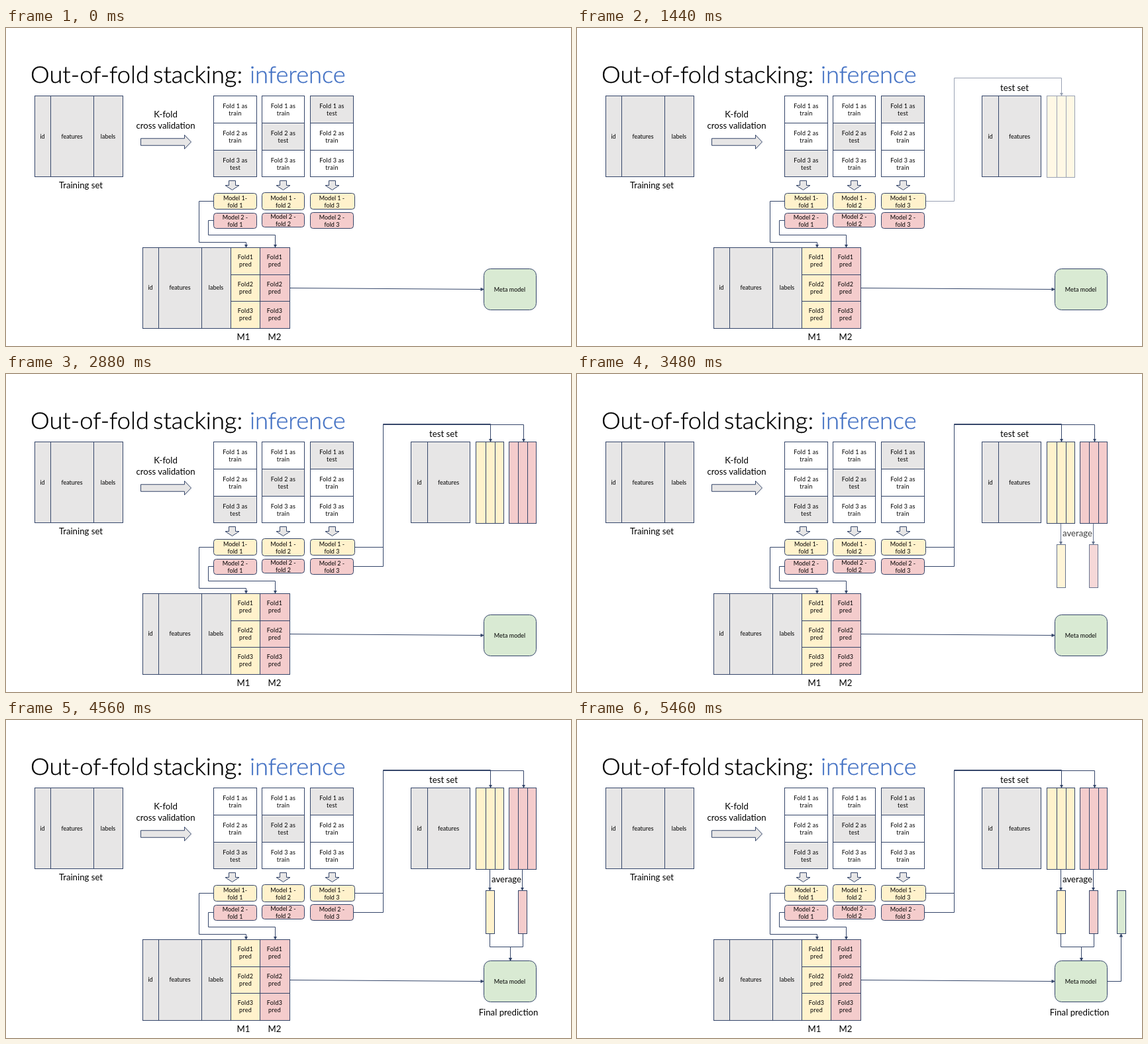
An HTML page that plays this animation: 853 px wide and 480 px high, repeating every 5.52 s.

```html
<!DOCTYPE html>
<html lang="en">
<head>
<meta charset="utf-8">
<title>Out-of-fold stacking</title>
<style>
  html, body { margin: 0; width: 100%; height: 100%; overflow: hidden; background: #fff; }
  svg { display: block; width: 853px; height: 480px; font-family: Lato, "Open Sans", sans-serif; }
  .shape, .line { stroke: #35466a; stroke-width: 1; }
  .line { fill: none; }
  .small { font-size: 9px; text-anchor: middle; }
  .fold { letter-spacing: .25px; }
  .label { font-size: 13.2px; text-anchor: middle; }
  .title { font-size: 36.3px; font-weight: 300; stroke: #000; stroke-width: .4; }
  .title .accent { fill: #4472c4; stroke: #4472c4; }
  .step { opacity: 0; animation: 5520ms infinite; animation-timing-function: steps(8); }

  /* Each step fades in over 480 ms and stays until the loop restarts. */
  #testSet  { animation-name: testSet; }
  #preds1   { animation-name: preds1; }
  #preds2   { animation-name: preds2; }
  #averages { animation-name: averages; }
  #final    { animation-name: final; }
  #result   { animation-name: result; }
  @keyframes testSet  { 0%, 5.4348%  { opacity: 0 } 14.1304%, 100% { opacity: 1 } }
  @keyframes preds1   { 0%, 21.7391% { opacity: 0 } 30.4348%, 100% { opacity: 1 } }
  @keyframes preds2   { 0%, 36.9565% { opacity: 0 } 45.6522%, 100% { opacity: 1 } }
  @keyframes averages { 0%, 56.5217% { opacity: 0 } 65.2174%, 100% { opacity: 1 } }
  @keyframes final    { 0%, 69.5652% { opacity: 0 } 78.2609%, 100% { opacity: 1 } }
  @keyframes result   { 0%, 84.7826% { opacity: 0 } 93.4783%, 100% { opacity: 1 } }
</style>
</head>
<body>
<svg id="stage" viewBox="0 0 853 480">
  <defs>
    <marker id="tip" markerUnits="userSpaceOnUse" markerWidth="6" markerHeight="6" refX="5" refY="3" orient="auto">
      <path d="M0 .3L5.5 3L0 5.7z" fill="#35466a"/>
    </marker>
  </defs>
  <text class="title" y="83"><tspan x="37">Out-of-fold</tspan> <tspan x="222">stacking:</tspan> <tspan x="368" class="accent">inference</tspan></text>
  <g id="base"></g>
  <g id="testSet" class="step"></g>
  <g id="preds1" class="step"></g>
  <g id="preds2" class="step"></g>
  <g id="averages" class="step"></g>
  <g id="final" class="step"></g>
  <g id="result" class="step"></g>
</svg>
<script>
const GRAY = '#e7e6e6', YELLOW = '#fff2cc', PINK = '#f4cccc', GREEN = '#d9ead3', WHITE = '#fff';
let layer;

function into(id) { layer = document.getElementById(id); }

function add(tag, attrs, content) {
  const el = document.createElementNS('http://www.w3.org/2000/svg', tag);
  for (const key in attrs) el.setAttribute(key, attrs[key]);
  if (content) el.textContent = content;
  layer.append(el);
}

// Shapes sit on half pixels so that their outlines stay crisp.
function box(left, top, right, bottom, fill, rx = 0) {
  add('rect', { class: 'shape', x: left + .5, y: top + .5, width: right - left, height: bottom - top, rx, fill });
}

function columns(edges, top, bottom, fill) {
  edges.slice(1).forEach((right, i) => box(edges[i], top, right, bottom, fill));
}

function text(x, y, content, kind = 'small') { add('text', { class: kind, x, y }, content); }

function lines(x, y, rows, kind) { rows.forEach((row, i) => text(x, y + i * 11, row, kind)); }

function outline(d, fill) { add('path', { class: 'shape', d, fill, transform: 'translate(.5 .5)' }); }

function arrow(d) { add('path', { class: 'line', d, 'marker-end': 'url(#tip)', transform: 'translate(.5 .5)' }); }

into('base');
columns([43, 67, 132, 176], 102, 224, GRAY);
text(55, 167, 'id');
text(99.5, 167, 'features');
text(154, 167, 'labels');
text(113, 242, 'Training set', 'label');
text(241, 135, 'K-fold', 'label');
text(241, 152, 'cross validation', 'label');
outline('M203 166.25H269V161L279 171.5L269 182V176.75H203z', GRAY);

[[313, 378], [386, 450], [459, 524]].forEach(([left, right], col) => {
  const mid = (left + right) / 2 + .5;
  for (let row = 0; row < 3; row++) {
    const isTest = row + col === 2;
    const top = [102, 143, 184][row];
    box(left, top, right, [143, 184, 224][row], isTest ? GRAY : WHITE);
    lines(mid, top + 18.5, [`Fold ${row + 1} as`, isTest ? 'test' : 'train'], 'small fold');
  }
  const x = [341, 418, 492][col];
  outline(`M${x - 5} 230h10v7h5.5L${x} 244L${x - 10.5} 237h5.5z`, GRAY);
  box(left, [249, 248, 249][col], [378, 450, 526][col], [273, 274, 273][col], YELLOW, 4);
  box(left, [279, 279, 278][col], right, [302, 300, 302][col], PINK, 4);
  lines(mid, 259.5, [col ? 'Model 1 -' : 'Model 1-', `fold ${col + 1}`]);
  lines(mid, col === 1 ? 287.5 : 288.5, ['Model 2 -', `fold ${col + 1}`]);
});

columns([206, 230, 295, 339], 331, 453, GRAY);
text(218, 395, 'id');
text(262.5, 395, 'features');
text(317, 395, 'labels');
[331, 372, 412].forEach((top, row) => {
  const bottom = [372, 412, 453][row];
  box(339, top, 383, bottom, YELLOW);
  box(383, top, 428, bottom, PINK);
  for (const x of [361.5, 405.5]) lines(x, top + 18.3, [`Fold${row + 1}`, 'pred'], 'small fold');
});
text(358.5, 471, 'M1', 'label');
text(405.5, 471, 'M2', 'label');
arrow('M313 261H291V323H362V331');
arrow('M313 290H305V312H406V331');
box(721, 363, 800, 425, GREEN, 10);
text(760.5, 397.5, 'Meta model');
arrow('M428 392L721 394');

into('testSet');
columns([611, 636, 700], 102, 224, GRAY);
text(624, 167, 'id');
text(668, 167, 'features');
text(660.5, 95, 'test set', 'label');

into('preds1');
columns([709, 724, 738, 751], 102, 225, YELLOW);
arrow('M526 261H569V75H731V102');

into('preds2');
columns([759, 773, 787, 800], 102, 225, PINK);
arrow('M524 290H569V76H781V102');

into('averages');
box(724, 257, 737, 322, YELLOW);
box(773, 257, 786, 322, PINK);
arrow('M730 225V257');
arrow('M779 225V257');
text(755.5, 245, 'average', 'label');

into('final');
arrow('M730 322V342H761V363');
arrow('M780 322V342H761V363');
text(758.5, 446, 'Final prediction', 'label');

into('result');
box(815, 257, 828, 322, GREEN);
arrow('M800 394H821V322');
</script>
</body>
</html>
```
